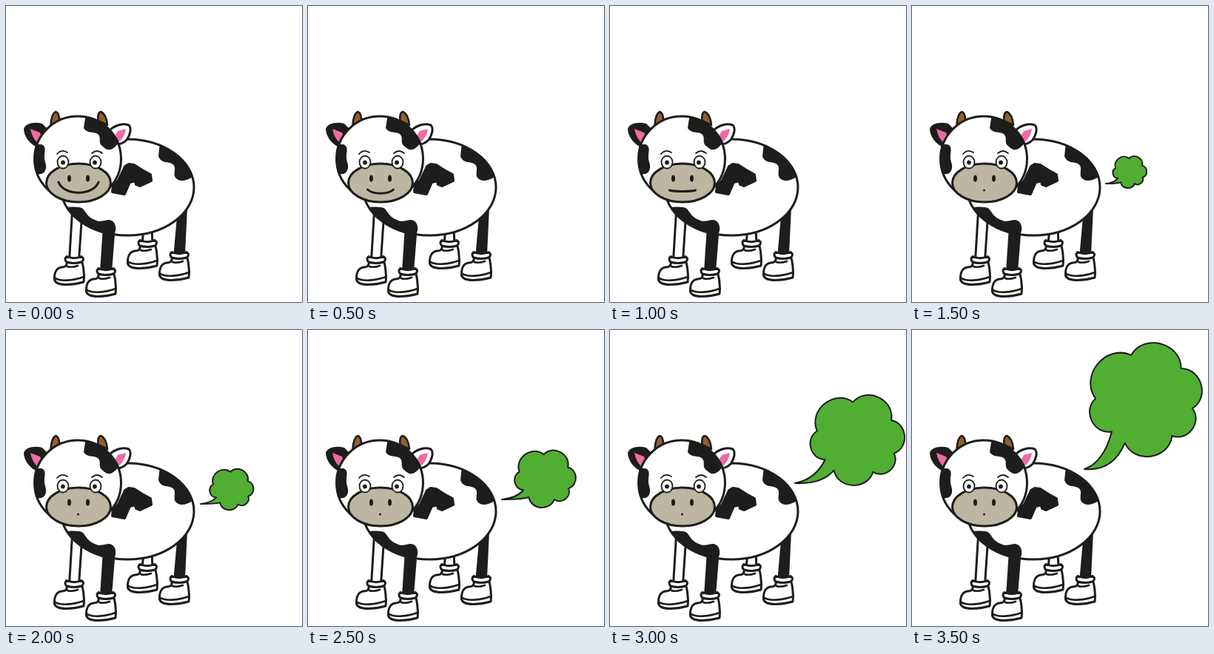
These frames come from a looping animation (400 px wide and 400 px high, 4 s). An HTML page:

```html
<!DOCTYPE html>
<html lang="en">
<head>
<meta charset="utf-8">
<title>Cow</title>
<style>
html, body { margin: 0; width: 100%; height: 100%; overflow: hidden; background: #fff; }
svg { display: block; width: 100vw; height: 100vh; }
.ink { fill: #1d1d1b; }
.line { fill: none; stroke: #1d1d1b; stroke-linecap: round; stroke-linejoin: round; }
.skin { fill: #fff; stroke: #1d1d1b; stroke-width: 3; stroke-linejoin: round; }
.pink { fill: #ee6ba4; }
.horn { fill: #93602c; stroke: #1d1d1b; stroke-width: 2.6; stroke-linejoin: round; }
#gas { fill: #50ae33; stroke: #1d1d1b; stroke-width: 2; stroke-linejoin: round; }
</style>
</head>
<body>
<svg viewBox="0 0 400 400">
  <defs>
    <clipPath id="bodyClip"><ellipse cx="164" cy="245" rx="90" ry="65"/></clipPath>
    <clipPath id="headClip"><ellipse cx="97" cy="206.500" rx="58.500" ry="57.500"/></clipPath>
    <g id="shoe">
      <path class="skin" d="M18 8C19 13 17 16 11 16C4 17 1 24 1.500 33C3 38 9 39.500 17 39.500C26 39.500 34 38 41 36L41.500 29C41 21 41 15 38.500 8Z"/>
      <path class="line" stroke-width="2.600" d="M1.500 30C8 36 28 34 41 29M19 15Q24 17 33 14"/>
      <path class="skin" stroke-width="2.600" d="M18 1.500Q28 6 38 1.500Q43 5 38 9Q28 12 18 9Q14 5 18 1.500Z"/>
    </g>
  </defs>

  <!-- legs and shoes -->
  <path class="skin" d="M186 300L184 322H198L197 300Z"/>
  <path class="ink" d="M231 285L226.500 335H242L245 272Z"/>
  <path class="skin" d="M89.500 278L85.500 344H98.500L102.500 284Z"/>
  <path class="ink" d="M131 298L127 359H143L148 296Z"/>
  <use href="#shoe" x="163" y="315"/>
  <use href="#shoe" x="206" y="331"/>
  <use href="#shoe" x="64" y="337"/>
  <use href="#shoe" x="107" y="353"/>

  <!-- body -->
  <ellipse class="skin" cx="164" cy="245" rx="90" ry="65"/>
  <g class="ink" clip-path="url(#bodyClip)">
    <path d="M208 184L206 203C210 213 218 210 224 213C232 217 225 226 229 232C234 238 242 237 252 231V200Z"/>
    <path stroke="#1d1d1b" stroke-width="4" stroke-linejoin="round" d="M161 217L166 214L173 215L184 222L195 228L196 236L181 243L176 241L175 236L167 238L160 254L144 251L145 243L152 236Z"/>
    <path d="M78 273C88 271 100 271 104 274C109 280 110 285 120 289C128 293 132 289 140 289C149 291 150 302 146 309L128 315L84 300Z"/>
  </g>

  <!-- horns and ears -->
  <path class="horn" d="M60.500 161C61 152 63 145 67 143C71 143 72 149 72.500 156Z"/>
  <path class="horn" d="M124.500 155C123.500 148 125 143 128.500 143C133 145 136 151 137 161Z"/>
  <path class="ink" d="M44 192C32 187 24 176 24 166C26 158 39 156 49 159L58 168Z"/>
  <path class="pink" d="M33 166L46 171L49 179L45 187Q35 179 33 166Z"/>
  <path class="skin" d="M140 168C147 161 158 158 166 161C170 165 168 174 163 181C159 185 154 187 149 187Z"/>
  <path class="pink" d="M146 178L151 169L162 166Q161 177 151 185Z"/>

  <!-- head -->
  <ellipse class="skin" cx="97" cy="206.500" rx="58.500" ry="57.500"/>
  <g class="ink" clip-path="url(#headClip)">
    <path d="M108 145L105 165C110 173 118 169 124 173C130 178 123 185 131 190C137 196 143 197 153 184L140 150Z"/>
    <path d="M36 187H48C55 190 52 196 52 202C51 209 55 213 54 219C53 225 49 228 43 227L36 220Z"/>
  </g>
  <ellipse cx="98" cy="239" rx="43.500" ry="26" fill="#bdb6a2" stroke="#1d1d1b" stroke-width="3"/>
  <ellipse class="ink" cx="85.500" cy="233" rx="2.500" ry="4.500"/>
  <ellipse class="ink" cx="110.500" cy="233" rx="2.500" ry="4.500"/>
  <g fill="#fff" stroke="#1d1d1b" stroke-width="1.800">
    <ellipse cx="77" cy="211" rx="7.500" ry="8.500"/>
    <ellipse cx="121" cy="211" rx="7.500" ry="8.500"/>
  </g>
  <circle class="ink" cx="77" cy="211.500" r="2.900"/>
  <circle class="ink" cx="120" cy="211.500" r="2.900"/>
  <path class="line" stroke-width="1.800" d="M69 200Q75 193 83 198M116 199Q123 193 130 199"/>
  <path id="mouth" class="line" stroke-width="3"/>
  <path id="gas"/>
</svg>
<script>
const STEP = 500, COUNT = 8;
const mouth = document.getElementById('mouth');
const gas = document.getElementById('gas');

// Smile from wide to flat, then a small dot.
function mouthPath(i) {
  if (i > 2) return 'M97.5 249h.01';
  const half = i ? 17.5 : 27, y = i ? 247 + i : 238, dip = [19, 7, 2][i];
  return `M${98 - half} ${y}c7 ${dip} ${2 * half - 7} ${dip} ${2 * half} 0`;
}

// Notches between the lobes, in a unit box, clockwise from the tail.
const notches = [[.14, .71], [.07, .38], [.48, .07], [.89, .3], [.9, .68], [.66, .88], [.23, .84]];

// Each puff: body box, turn in degrees, tail tip.
const puffs = [
  { x: 272, y: 203, w: 44, h: 42, turn: 0, tip: [262, 240] },
  { x: 276, y: 188, w: 57, h: 54, turn: 0, tip: [263, 235] },
  { x: 280, y: 163, w: 80, h: 75, turn: 0, tip: [262, 229] },
  { x: 272, y: 89, w: 123, h: 118, turn: -3, tip: [250, 207] },
  { x: 240, y: 21, w: 149, h: 147, turn: -14, tip: [233, 188] }
];

function place({ x, y, w, h, turn }, [u, v]) {
  const a = turn * Math.PI / 180, c = Math.cos(a), s = Math.sin(a);
  u -= .5;
  v -= .5;
  return [x + w * (.5 + u * c - v * s), y + h * (.5 + u * s + v * c)];
}

// A round bump to the left of the way from a to b.
function lobe(a, b) {
  const dx = b[0] - a[0], dy = b[1] - a[1], out = .48, inset = .13;
  const nx = dy * out, ny = -dx * out;
  return `C${a[0] + nx + dx * inset} ${a[1] + ny + dy * inset} ` +
    `${b[0] + nx - dx * inset} ${b[1] + ny - dy * inset} ${b}`;
}

function puffPath(p) {
  const pts = notches.map(n => place(p, n));
  const [tx, ty] = p.tip, first = pts[0], last = pts[pts.length - 1];
  const bend = ([x, y], rise) => [x + (tx - x) * .3, ty + rise * (y - ty)];
  return `M${p.tip}Q${bend(first, .18)} ${first}` +
    pts.slice(1).map((b, i) => lobe(pts[i], b)).join('') +
    `Q${bend(last, -.1)} ${p.tip}Z`;
}

let shown = -1;
function draw(ms) {
  const i = Math.floor(ms / STEP) % COUNT;
  if (i === shown) return;
  shown = i;
  const puff = puffs[i - 3];
  mouth.setAttribute('d', mouthPath(i));
  gas.setAttribute('d', puff ? puffPath(puff) : '');
}

const start = performance.now();
function tick() {
  draw(performance.now() - start);
  requestAnimationFrame(tick);
}
draw(0);
requestAnimationFrame(tick);
</script>
</body>
</html>
```
